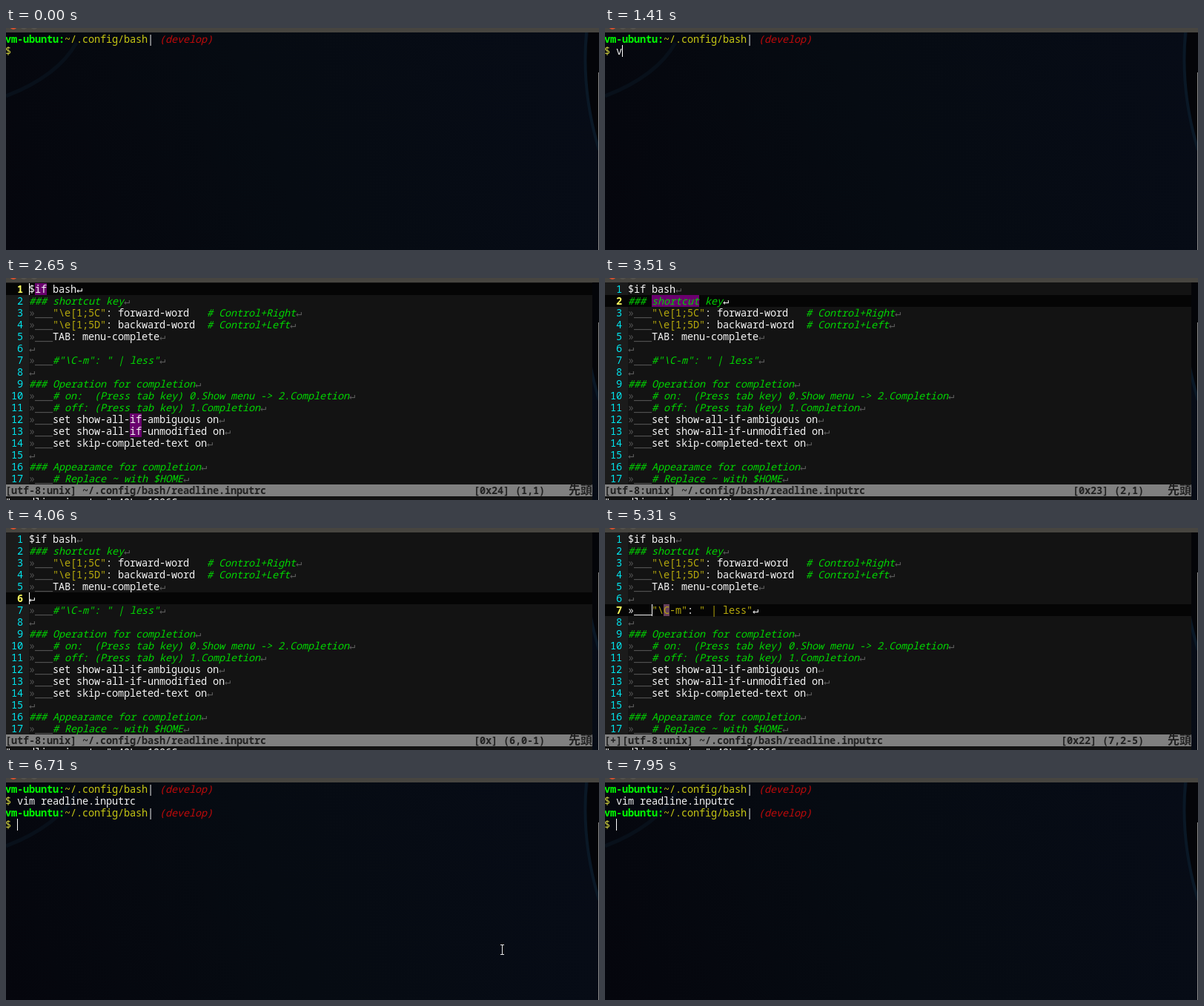
An HTML page with a canvas for the animation above (8000 ms loop, 800x300 px).

```html
<!DOCTYPE html>
<html>
<head>
<meta charset="utf-8">
<style>
html, body { margin: 0; width: 100%; height: 100%; overflow: hidden; background: #070b12; }
canvas { display: block; }
</style>
</head>
<body>
<canvas id="stage" width="800" height="300"></canvas>
<script>
const ctx = document.getElementById('stage').getContext('2d');
const LOOP = 8000, CELL = 8, ROW = 16, LEFT = -1, TOP = 7;
const FONT = '13.6px "Noto Sans Mono", "DejaVu Sans Mono", monospace';
const COMMAND = 'vim readline.inputrc ';

const FILE = [
  '$if bash',
  '### shortcut key',
  '»___"\\e[1;5C": forward-word   # Control+Right',
  '»___"\\e[1;5D": backward-word  # Control+Left',
  '»___TAB: menu-complete',
  '',
  '»___#"\\C-m": " | less"',
  '',
  '### Operation for completion',
  '»___# on:  (Press tab key) 0.Show menu -> 2.Completion',
  '»___# off: (Press tab key) 1.Completion',
  '»___set show-all-if-ambiguous on',
  '»___set show-all-if-unmodified on',
  '»___set skip-completed-text on',
  '',
  '### Appearamce for completion',
  '»___# Replace ~ with $HOME'
];

// [start, characters typed at the prompt]
const TYPED = [[0, 0], [1240, 1], [1490, 2], [1640, 4], [1870, 5], [1940, 6], [2110, 21]];

// [start, cursor line, cursor column, position info, highlighted word]
const EDITOR = [
  [2650, 1, 0, '[0x24] (1,1)', 'if'],
  [3430, 2, 0, '[0x23] (2,1)', 'if'],
  [3510, 2, 0, '[0x23] (2,1)', 'shortcut'],
  [3660, 3, 0, '[0x9] (3,1)', 'e'],
  [3830, 4, 0, '[0x9] (4,1)', 'e'],
  [3980, 5, 0, '[0x9] (5,1)', 'TAB'],
  [4060, 6, 0, '[0x] (6,0-1)', 'TAB'],
  [4610, 7, 0, '[0x9] (7,1)', 'C'],
  [4760, 7, 4, '[0x23] (7,2-5)', 'C'],
  [5310, 7, 4, '[0x22] (7,2-5)', 'C']
];

const COMMAND_LINE = [[5310, ''], [6160, ':'], [6410, ':w'], [6560, ':wq']];

// [start, pointer shape, x, y]
const POINTER = [
  [0], [70, arrow, 682, 248], [160], [1010, beam, 667, 225], [1240],
  [2410, arrow, 668, 231], [2650], [6480, beam, 667, 225], [7950]
];

const CURSOR = [
  [0, false], [70, true], [710, false], [1240, true], [2410, false], [2650, true],
  [3140, false], [3430, true], [3510, false], [3660, true], [7260, false], [7720, true]
];

const at = (steps, t) => steps.filter(s => s[0] <= t).pop();

function rect(x, y, w, h, color) {
  ctx.fillStyle = color;
  ctx.fillRect(x, y, w, h);
}

function text(str, col, row, color, style = '') {
  ctx.font = style + ' ' + FONT;
  ctx.fillStyle = color;
  [...str].forEach((ch, i) => ctx.fillText(ch, LEFT + (col + i) * CELL, TOP + row * ROW + 13));
  return col + str.length;
}

function cursor(col, row) {
  rect(LEFT + col * CELL, TOP + row * ROW, 1, ROW, '#fff');
}

function curve(path, color, width) {
  ctx.strokeStyle = color;
  ctx.lineWidth = width;
  ctx.stroke(path);
}

function backdrop() {
  const g = ctx.createLinearGradient(0, 300, 800, 0);
  g.addColorStop(0, '#05060d');
  g.addColorStop(0.45, '#060b12');
  g.addColorStop(1, '#070c17');
  rect(0, 0, 800, 300, g);
  curve(new Path2D('M95 20Q70 65 0 92'), '#08101a', 5);
  ctx.fillStyle = '#040509';
  ctx.fill(new Path2D('M786 6Q776 80 800 165V6Z'));
  curve(new Path2D('M783 6Q776 85 800 165'), '#0a1826', 4);
}

function windowFrame() {
  rect(0, 0, 800, 6, '#474540');
  [['#d9502e', 10], ['#55534d', 24], ['#55534d', 38]].forEach(([color, x]) => {
    ctx.fillStyle = color;
    ctx.beginPath();
    ctx.arc(x, -3, 5, 0, 7);
    ctx.fill();
  });
  rect(799, 60, 1, 240, '#8a8a8a');
}

function prompt(row) {
  let col = text('vm-ubuntu:', 0, row, '#00ff00', 'bold');
  col = text('~/.config/bash', col, row, '#c8c814');
  text('|', col, row, '#eee');
  text('(develop)', col + 2, row, '#c00a0a', 'italic');
  text('$', 0, row + 1, '#d0d040');
}

function shell(t) {
  const ended = t >= 6640;
  const typed = ended ? COMMAND.length : at(TYPED, t)[1];
  prompt(0);
  text(COMMAND.slice(0, typed), 2, 1, '#f2f2f2');
  if (t >= 6710) prompt(2);
  if (!at(CURSOR, t)[1]) return;
  if (!ended) cursor(2 + typed, 1);
  else if (t < 6710) cursor(0, 2);
  else cursor(2, 3);
}

function fileLine(line, row, active, word, wordColor) {
  const y = TOP + row * ROW;
  if (active) rect(0, y, 791, ROW, '#050505');
  text(String(row + 1).padStart(3), 0, row, active ? '#ffff60' : '#00e5ee', active ? 'bold' : '');
  for (const m of line.matchAll(new RegExp(`\\b${word}\\b`, 'g')))
    rect(LEFT + (4 + m.index) * CELL, y, word.length * CELL, ROW, wordColor);
  let col = 4;
  for (const part of line.match(/»_+|"[^"]*"|#.*|[^"#»]+/g) || []) {
    const kind = part[0];
    if (kind === '»') col = text(part, col, row, active ? '#ddd' : '#505050');
    else if (kind === '#') col = text(part, col, row, '#00d700', 'italic');
    else col = text(part, col, row, kind === '"' ? '#b5a80c' : '#f4f4f4');
  }
  text('↵', col, row, active ? '#f4f4f4' : '#5c5c5c');
}

function editor(t) {
  const [, line, col, info, word] = at(EDITOR, t);
  const edited = t >= 5310, command = t >= 6160;
  rect(0, 6, 791, 294, '#131313');
  rect(0, 6, 31, 273, '#1b1b1b');
  FILE.forEach((str, i) => {
    if (i === 6 && edited) str = str.replace('#', '');
    fileLine(str, i, i === line - 1, word, edited ? '#68405c' : '#6a006e');
  });

  rect(0, 279, 791, ROW, '#808080');
  const title = (edited ? '[+]' : '') + '[utf-8:unix] ~/.config/bash/readline.inputrc';
  text(title, 0, 17, '#202020', 'bold');
  text(info, 91 - info.length, 17, '#202020', 'bold');
  ctx.font = 'bold 16px "Noto Sans CJK JP", "Noto Sans CJK", sans-serif';
  ctx.fillText('先頭', 759, 292);

  const message = command ? at(COMMAND_LINE, t)[1] : '"readline.inputrc" 42L, 1286C';
  text(message, 0, 18, '#f4f4f4');
  if (command) cursor(message.length, 18);
  else if (at(CURSOR, t)[1]) cursor(4 + col, line - 1);
}

function arrow() {
  const shape = new Path2D('M.5 .5V14L3.6 11L6 16.5L8.4 15.4L6 10.2H10Z');
  ctx.fillStyle = '#fff';
  ctx.fill(shape);
  curve(shape, '#000', 1);
}

function beam() {
  curve(new Path2D('M0 .5H5M2.5 0V14M0 13.5H5'), '#e8e8e8', 1);
}

function frame(now) {
  const t = now % LOOP;
  backdrop();
  if (t >= 2650 && t < 6640) editor(t);
  else shell(t);
  windowFrame();
  const [, draw, x, y] = at(POINTER, t);
  if (draw) {
    ctx.save();
    ctx.translate(x, y);
    draw();
    ctx.restore();
  }
}

const start = performance.now();
function tick() {
  frame(performance.now() - start);
  requestAnimationFrame(tick);
}
tick();
</script>
</body>
</html>
```
